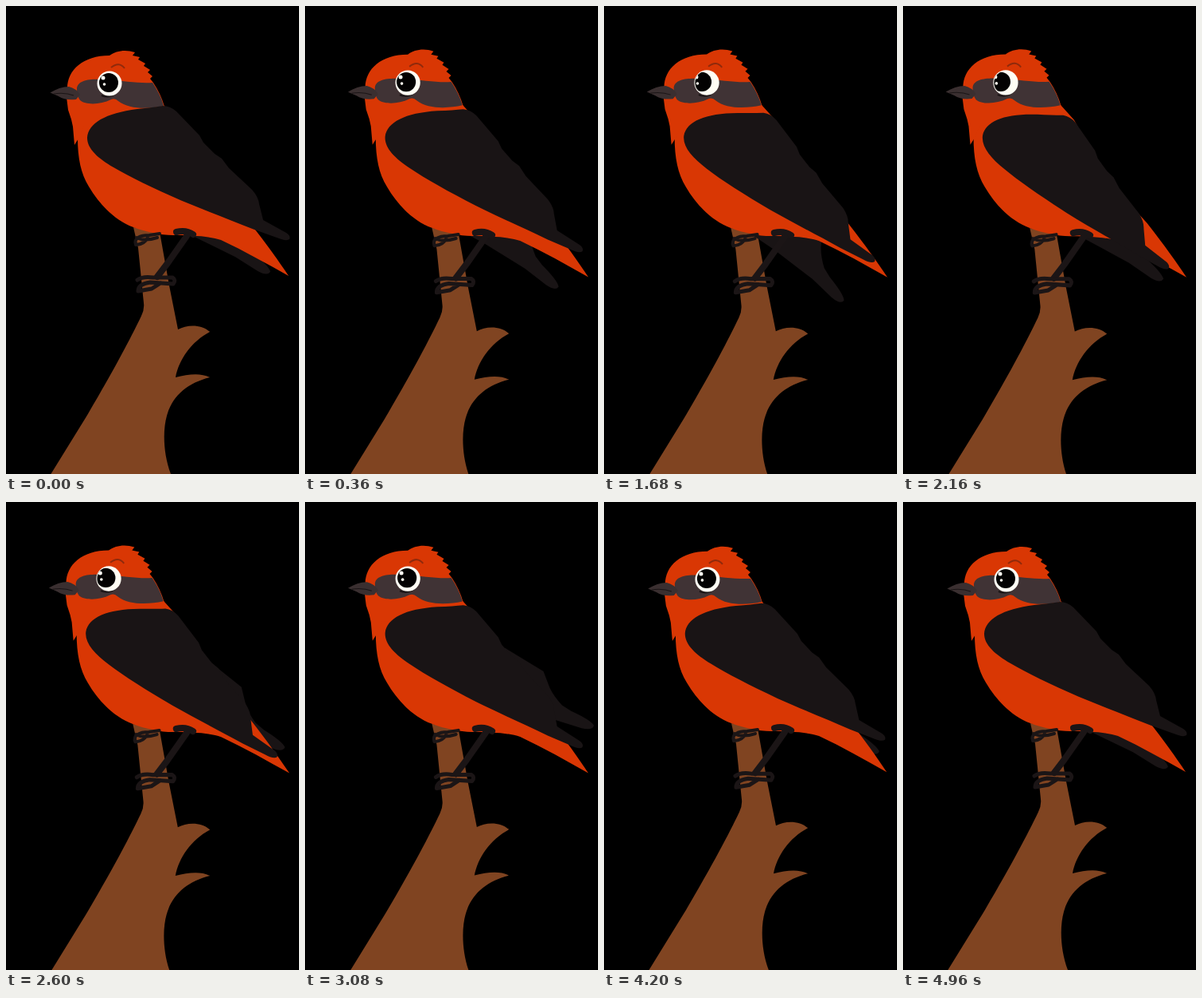
Animation, 368 px wide and 586 px high, one loop 5000 ms. Source, as an HTML page:

```html
<!DOCTYPE html>
<html>
<head>
<meta charset="utf-8">
<style>
html, body { margin: 0; width: 100%; height: 100%; overflow: hidden; background: #000; }
svg { display: block; width: 100vw; height: 100vh; }
.line { fill: none; stroke: #1b1516; stroke-width: 5; stroke-linecap: round; stroke-linejoin: round; }
</style>
</head>
<body>
<svg viewBox="0 0 368 586">
  <defs>
    <clipPath id="eyeClip"><circle cx="130" cy="97" r="14.5"/></clipPath>
  </defs>
  <g id="scene">
    <path id="trunk" fill="#804421" d="M160 277L166 303 173 372Q174 380 170 388C156 417 136 455 101 514L57 585 45 605H216L207 586C197 560 197 530 202 513C209 488 228 472 256 465C244 459 229 461 213 465C217 443 233 420 256 408C245 398 227 399 216 405L205 350 193 283Z"/>
    <path id="farWing" fill="#191415" d="M150 250L178 289 203 309 248 350 270 375Q280 385 285 380Q285 372 270 350L264 338Q261 325 262 312L266 290 240 240Z"/>
    <path id="body" fill="#d93704" d="M90 120L85 140 90 165C90 190 94 210 104 226C118 250 138 269 160 277C176 283 194 287 210 287C232 287 255 288 270 293C300 307 328 323 355 338C343 320 328 299 306 271L255 215 215 143 196 122 150 100Z"/>
    <path id="head" fill="#d93704" d="M77 103C77 80 97 62 130 62C138 56 150 54 162 58L159 62 168 64 166 67 175 72 173 75 181 80 178 83 184 88 181 91 185 96C191 105 196 115 199 126L180 150H98L91 166 86 174 84 151 82 142 78 130 76 114Z"/>
    <path id="mask" fill="#403335" d="M89 104C89 92 108 91 122 92C150 94 166 97 184 96C190 105 195 114 198 125C180 129 155 130 141 119Q137 115 132 117C118 124 100 124 93 118Q89 113 89 104Z"/>
    <path id="beak" fill="#3a2f30" d="M55.500 108.500C63 104 71 101 79 101Q88 103 93 111L88 117C79 118 72 117 66 113Z"/>
    <path d="M60 110Q74 108 85 112" fill="none" stroke="#1b1516"/>
    <path d="M132 77Q142 69 149 78" fill="none" stroke="#8f2a0c" stroke-width="2"/>
    <path d="M120 112Q129 116 137 110" fill="none" stroke="#191415" stroke-width="2"/>
    <g id="eye">
      <circle cx="130" cy="97" r="15.5" fill="#fffdf4"/>
      <g clip-path="url(#eyeClip)">
        <g id="pupil">
          <circle cx="129" cy="96" r="12" fill="#030202"/>
          <circle cx="122" cy="90" r="2.5" fill="#fffdf4"/>
          <circle cx="123.500" cy="98" r="1.800" fill="#fffdf4"/>
        </g>
      </g>
    </g>
    <path id="nearWing" fill="#191415" d="M102 165C103 147 125 134 165 129Q185 127 197 125Q206 125 214 132L243 162 248 171 262 185 271 191 280 203 309 230Q317 239 318 248L323 268 352 284Q358 288 356 292Q352 295 340 290L312 280C280 267 250 256 220 243.500C185 228 155 214 135 202C116 191 102 179 102 165Z"/>
    <g class="line">
      <path d="M214 283Q226 280 235 286" stroke-width="8"/>
      <path d="M227 288L203 322 190 339" stroke-width="8"/>
      <path d="M165 343Q172 338 185 340H209Q214 343 210 348L181 346Q166 348 166 357L183 354 194 347"/>
      <path d="M163 299C160 291 168 287 180 287L193 285M164 290Q174 295 190 290M164 299Q174 298 178 290" stroke-width="4"/>
    </g>
  </g>
</svg>
<script>
const LOOP = 5000;
const times = [0, 360, 1200, 2160, 3080, 3960, 4200];
const tracks = {
  near: [0, 3.5, 4.2, 9, 3.5, 2.8, 1.4],
  far: [0, 5.4, 16.3, 2.3, -15, -13.5, -6],
  breath: [0, 1, 1, 1.2, 0.95, 0.9, 0.1],
  look: [0, -1, -5, -5, 0, 0, 0]
};
const set = (id, value) => document.getElementById(id).setAttribute('transform', value);

// Cyclic cubic interpolation that stays level at extremes.
function sample(values, t) {
  const n = times.length;
  const at = i => values[(i + n) % n];
  const time = i => times[(i + n) % n] + Math.floor(i / n) * LOOP;
  const secant = i => (at(i + 1) - at(i)) / (time(i + 1) - time(i));
  const slope = i => {
    const a = secant(i - 1), b = secant(i);
    return a * b > 0 ? 2 * a * b / (a + b) : 0;
  };
  let i = n - 1;
  while (times[i] > t) i--;
  const span = time(i + 1) - time(i), u = (t - time(i)) / span, v = 1 - u;
  return at(i) * (1 + 2 * u) * v * v + slope(i) * span * u * v * v
    + at(i + 1) * u * u * (3 - 2 * u) - slope(i + 1) * span * u * u * v;
}

function draw() {
  const t = performance.now() % LOOP;
  const pose = {};
  for (const name in tracks) pose[name] = sample(tracks[name], t);
  const blink = 1 - 0.28 * Math.max(0, 1 - Math.abs(t - 1200) / 140);
  const b = pose.breath;

  set('scene', `translate(240 190) scale(${1 + 0.008 * b} ${1 + 0.01 * b}) translate(-240 -190)`);
  set('farWing', `rotate(${pose.far - 16.3} 143 192)`);
  set('nearWing', `rotate(${pose.near} 120 160)`);
  set('pupil', `translate(${pose.look} 0)`);
  set('eye', `translate(0 ${97 * (1 - blink)}) scale(1 ${blink})`);
  requestAnimationFrame(draw);
}
draw();
</script>
</body>
</html>
```
